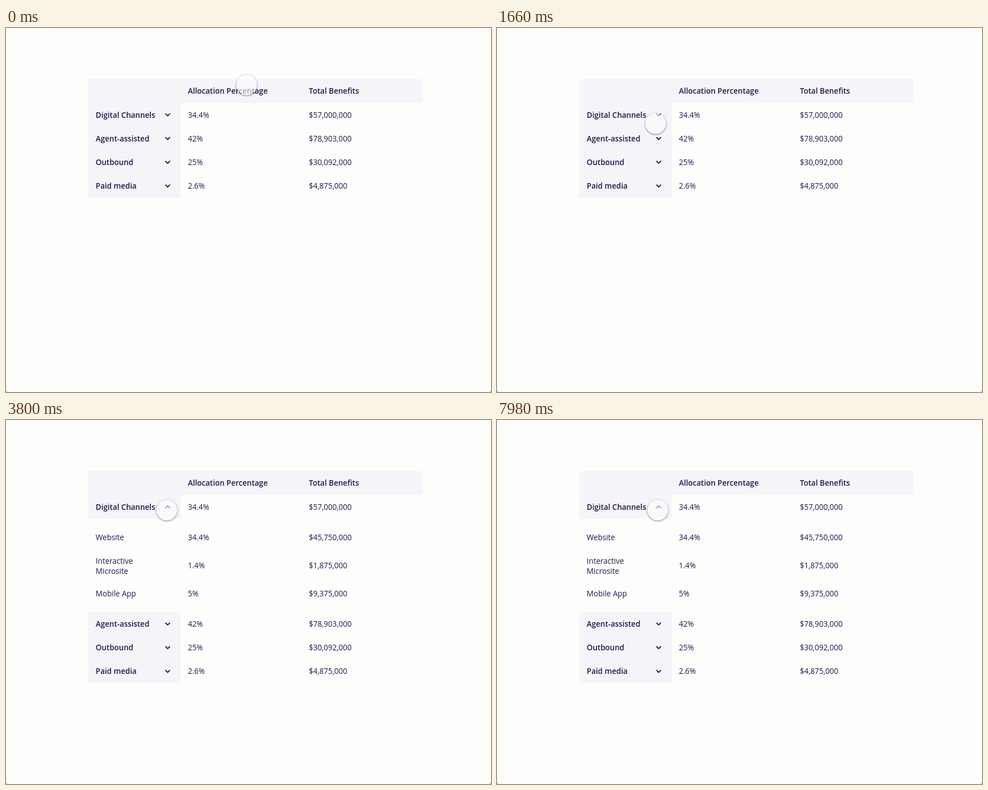
Recreate the animation shown at these times as an HTML page. Size 864x648 px, loop 8000 ms.

```html
<!DOCTYPE html>
<html lang="en">
<head>
<meta charset="utf-8">
<title>Allocation table</title>
<style>
  html, body { margin: 0; width: 100%; height: 100%; overflow: hidden; background: #fdfdfc; }
  svg { display: block; width: 100vw; height: 100vh; }
  text { font: 400 13.55px "Open Sans", "Noto Sans", sans-serif; fill: #1b1b4f; }
  .bold { font-weight: 600; }
  .panel { fill: #f4f4f9; }
  .chevron { fill: none; stroke: #1b1b4f; stroke-width: 1.9; stroke-linecap: round; stroke-linejoin: round; }
</style>
</head>
<body>
<svg id="stage" viewBox="0 0 864 648">
  <defs>
    <filter id="blur" x="-30%" y="-30%" width="160%" height="160%">
      <feGaussianBlur stdDeviation="1.6"/>
    </filter>
    <mask id="ring" maskUnits="userSpaceOnUse" x="-30" y="-30" width="60" height="60">
      <rect x="-30" y="-30" width="60" height="60" fill="#fff"/>
      <circle r="18.3" fill="#000"/>
    </mask>
  </defs>
  <rect width="864" height="648" fill="#fdfdfc"/>
  <path d="M0 644.5Q0 648 3.5 648H0ZM864 644.5Q864 648 860.5 648H864Z" fill="#777"/>
  <g id="table"></g>
  <g id="cursor">
    <g mask="url(#ring)">
      <circle cy="1" r="18.8" fill="#000" opacity=".42" filter="url(#blur)"/>
    </g>
    <circle r="18.5" fill="#fdfdfd" opacity=".6"/>
  </g>
</svg>
<script>
const LOOP = 8000, OPEN_AT = 3640;
const ROW = 42.17, TOP = 91.2, EXTRA = 166.3;
const COLS = [159.8, 324, 539.5];
const table = document.getElementById("table");
const cursor = document.getElementById("cursor");

function add(parent, tag, attrs, content) {
  const el = document.createElementNS("http://www.w3.org/2000/svg", tag);
  for (const key in attrs) el.setAttribute(key, attrs[key]);
  if (content) el.textContent = content;
  return parent.appendChild(el);
}
const group = () => add(table, "g", {});
const label = (parent, col, y, content, bold) =>
  add(parent, "text", { x: COLS[col], y, class: bold ? "bold" : "" }, content);
const panel = (parent, y, width, height) =>
  add(parent, "rect", { x: 146.5, y, width, height, class: "panel" });

function addRow(parent, index, name, percent, total) {
  const y = TOP + ROW * index + 26.2;
  label(parent, 0, y, name, true);
  label(parent, 1, y, percent);
  label(parent, 2, y, total);
  return add(parent, "path", { d: "M-3.6-1.8L0 1.8L3.6-1.8", class: "chevron", transform: `translate(288 ${y - 4.9})` });
}

const head = group(), details = group(), rest = group();

panel(head, TOP, 595, ROW);
panel(head, TOP + ROW - 0.3, 164.5, ROW + 0.3);
label(head, 1, TOP + 26.1, "Allocation Percentage", true);
label(head, 2, TOP + 26.1, "Total Benefits", true);
const toggle = addRow(head, 1, "Digital Channels", "34.4%", "$57,000,000");

[
  [213.8, "34.4%", "$45,750,000", ["Website", 213.8]],
  [263.5, "1.4%", "$1,875,000", ["Interactive", 256], ["Microsite", 274.4]],
  [314.1, "5%", "$9,375,000", ["Mobile App", 314.1]]
].forEach(([y, percent, total, ...lines]) => {
  lines.forEach(([name, lineY]) => label(details, 0, lineY, name));
  label(details, 1, y, percent);
  label(details, 2, y, total);
});

panel(rest, TOP + ROW * 2 - 0.3, 164.5, ROW * 3 + 0.3);
addRow(rest, 2, "Agent-assisted", "42%", "$78,903,000");
addRow(rest, 3, "Outbound", "25%", "$30,092,000");
addRow(rest, 4, "Paid media", "2.6%", "$4,875,000");

const ease = (t, from, to) => {
  const p = Math.min(1, Math.max(0, (t - from) / (to - from)));
  return p * p * (3 - 2 * p);
};

// The picture steps three times per 140 ms: 20, 100 and 20 ms long.
function step(t) {
  const rem = t % 140;
  return t - rem + (rem < 20 ? 0 : rem < 120 ? 20 : 120);
}

function draw(time) {
  const t = step(time % LOOP);
  const travel = ease(t, 840, 1720), settle = ease(t, 2200, 2700);
  const x = 428.6 - 148 * travel + 5.9 * settle;
  const y = 101.2 + 70 * travel - 10.9 * settle;
  cursor.setAttribute("transform", `translate(${x} ${y})`);

  const open = t >= OPEN_AT;
  details.setAttribute("visibility", open ? "visible" : "hidden");
  rest.setAttribute("transform", `translate(0 ${open ? EXTRA : 0})`);
  toggle.setAttribute("transform", `translate(288 154.6) scale(1 ${open ? -1 : 1})`);
}

const start = performance.now();
function tick() {
  draw(performance.now() - start);
  requestAnimationFrame(tick);
}
tick();
</script>
</body>
</html>
```
